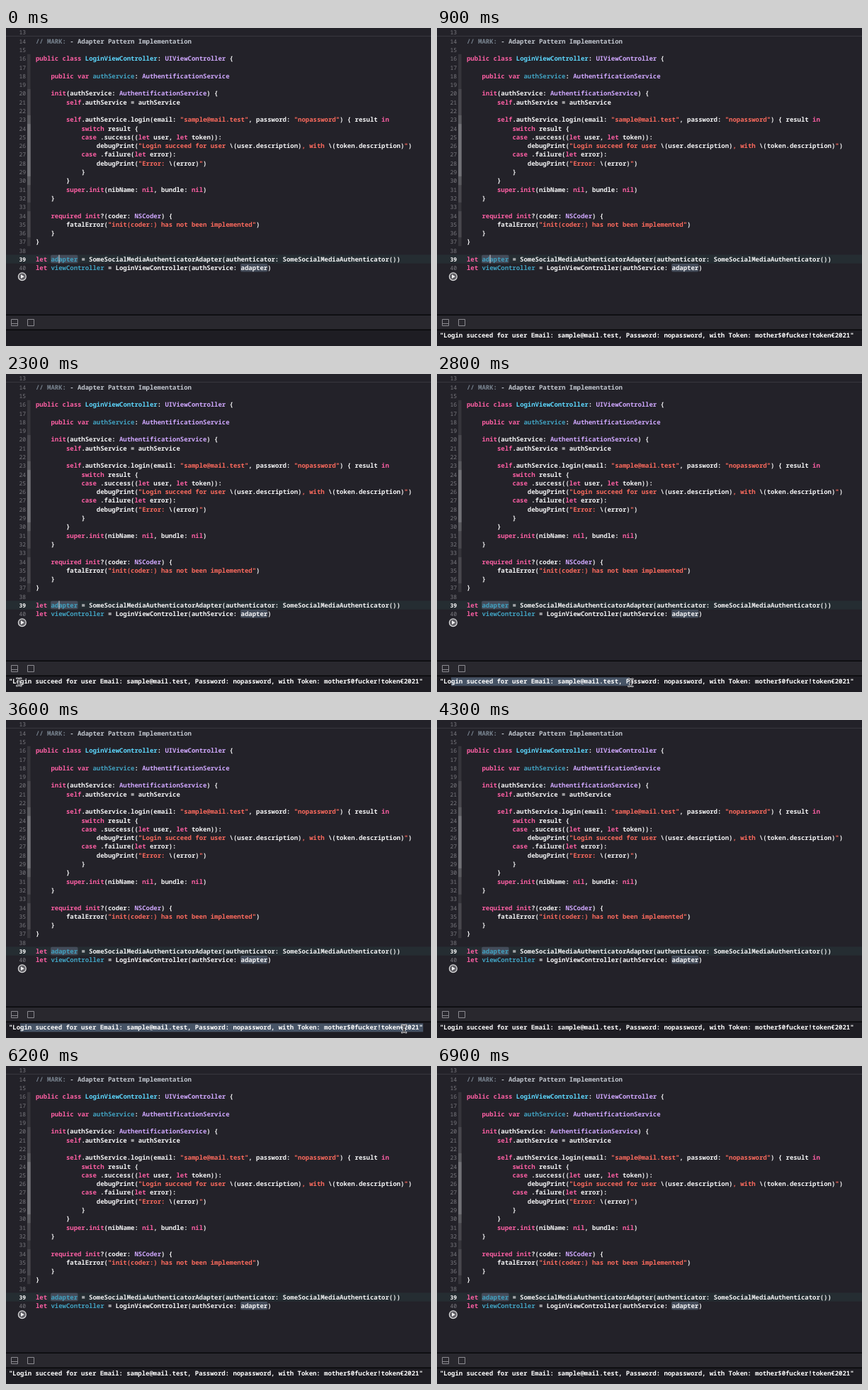
Write an HTML page that moves like this. It is 600x448 px and loops after 7 s.

```html
<!DOCTYPE html>
<html lang="en">
<head>
<meta charset="utf-8">
<title>Adapter pattern playground</title>
<style>
  html, body { margin: 0; width: 100%; height: 100%; overflow: hidden; background: #232229; }
  svg { display: block; }
  text {
    font: 600 8.945px "Noto Sans Mono", "DejaVu Sans Mono", monospace;
    text-rendering: geometricPrecision;
    white-space: pre;
    fill: #f4f4f5;
  }
  .num { font-size: 8px; font-weight: 500; fill: #7b7a80; text-anchor: end; }
  .num.on { font-weight: 600; fill: #fff; }
  .keyword { font-weight: 700; fill: #fc5fa3; }
  .string { fill: #fc6a5d; }
  .type { fill: #d0a8ff; }
  .class { fill: #5dd8ff; }
  .decl { fill: #41a1c0; }
  .comment { fill: #7a8591; }
  .mark { fill: #c3c8d0; }
  #log { font-weight: 700; fill: #fff; }
</style>
</head>
<body>
<svg id="stage" width="600" height="448" viewBox="0 0 600 448">
  <rect width="600" height="448" fill="#232229"/>
  <rect y="11" width="600" height="1" fill="#38373e"/>
  <rect y="319.4" width="600" height="12.3" fill="#252d32"/>
  <g id="ribbons"></g>
  <g fill="#434b59">
    <rect x="63" y="319.7" width="38.5" height="11.6" rx="2"/>
    <rect x="331" y="332" width="38.5" height="11.6" rx="2"/>
  </g>
  <g id="code"></g>
  <rect id="caret" x="74.5" y="319.6" width="1" height="11.8" fill="#d8d8dc"/>
  <circle cx="22.8" cy="350.2" r="5.4" fill="#5e5d63" stroke="#dededf" stroke-width="1.2"/>
  <path d="M21 347.3 L25.8 350.2 L21 353.1 Z" fill="#f0f0f1"/>
  <rect y="404" width="600" height="44" fill="#1e1d23"/>
  <rect y="404" width="600" height="21" fill="#29282e"/>
  <path d="M0 404.3H600M0 425.3H600" stroke="#08080a" stroke-width="1.4"/>
  <path d="M7.5 410.5h9v9h-9zM7.5 416.5h9M30.5 410.5h9v9h-9z" fill="none" stroke="#8b8a90"/>
  <rect id="selection" x="20" y="427.4" height="12" fill="#465365"/>
  <text id="log" x="4" y="436.4"></text>
  <g id="mouse" fill="none" stroke-linecap="round">
    <path d="M-3 -5.2Q0 -5.2 0 -3V3Q0 5.2 -3 5.2M3 -5.2Q0 -5.2 0 -3V3Q0 5.2 3 5.2M-1.6 1.5H1.6" stroke="#e8e8ea" stroke-width="2.4"/>
    <path d="M-3 -5.2Q0 -5.2 0 -3V3Q0 5.2 -3 5.2M3 -5.2Q0 -5.2 0 -3V3Q0 5.2 3 5.2M-1.6 1.5H1.6" stroke="#151419" stroke-width="0.9"/>
  </g>
</svg>
<script>
const LOOP = 7000, FIRST = 13, PITCH = 12.29, CHAR = 5.367, LEFT = 42;
const $ = id => document.getElementById(id);
const baseline = n => 21.7 + (n - 14) * PITCH;

const source = String.raw`
// MARK: - Adapter Pattern Implementation

public class LoginViewController: UIViewController {

    public var authService: AuthentificationService

    init(authService: AuthentificationService) {
        self.authService = authService

        self.authService.login(email: "sample@mail.test", password: "nopassword") { result in
            switch result {
            case .success((let user, let token)):
                debugPrint("Login succeed for user \(user.description), with \(token.description)")
            case .failure(let error):
                debugPrint("Error: \(error)")
            }
        }
        super.init(nibName: nil, bundle: nil)
    }

    required init?(coder: NSCoder) {
        fatalError("init(coder:) has not been implemented")
    }
}

let adapter = SomeSocialMediaAuthenticatorAdapter(authenticator: SomeSocialMediaAuthenticator())
let viewController = LoginViewController(authService: adapter)`.split("\n");

const syntax = new RegExp([
  String.raw`(?<comment>\/\/ MARK:)`,
  String.raw`(?<mark>- Adapter .*)`,
  String.raw`(?<string>"(?:\\\([^)]*\)|[^"\\])*")`,
  String.raw`(?<class>(?<=class )\w+)`,
  String.raw`(?<decl>(?<=(?:var|let) )(?:authService|adapter|viewController))`,
  String.raw`(?<type>\b(?:UIViewController|AuthentificationService|NSCoder)\b)`,
  String.raw`(?<keyword>\b(?:public|class|var|let|init|self|super|switch|case|in|nil|required)\b)`
].join("|"), "g");

function add(parent, tag, attrs, text) {
  const el = document.createElementNS("http://www.w3.org/2000/svg", tag);
  for (const key in attrs) el.setAttribute(key, attrs[key]);
  if (text) el.textContent = text;
  return parent.appendChild(el);
}

function span(parent, text, kind) {
  if (text) add(parent, "tspan", kind ? { class: kind } : {}, text);
}

function highlight(row, line) {
  let end = 0;
  for (const match of line.matchAll(syntax)) {
    span(row, line.slice(end, match.index));
    const kind = Object.keys(match.groups).find(k => match.groups[k]);
    if (kind === "string") {
      for (const part of match[0].split(/(\\\([^)]*\))/)) {
        span(row, part, part.startsWith("\\") ? "" : kind);
      }
    } else {
      span(row, match[0], kind);
    }
    end = match.index + match[0].length;
  }
  span(row, line.slice(end));
}

source.forEach((line, i) => {
  const n = FIRST + i, y = baseline(n);
  add($("code"), "text", { x: 28, y, class: n === 39 ? "num on" : "num" }, String(n));
  const indent = line.search(/\S|$/);
  highlight(add($("code"), "text", { x: LEFT + indent * CHAR, y }), line.trim());
});

// Nested code-folding ribbons: first line, last line, colour
[[16, 37, "#36353b"], [20, 32, "#48474d"], [34, 36, "#48474d"],
 [23, 30, "#5a5a5f"], [24, 29, "#727277"]].forEach(([from, to, fill]) =>
  add($("ribbons"), "rect", {
    x: 30, y: baseline(from) - 9.4, width: 4.5, height: (to - from + 1) * PITCH, fill
  }));

$("log").textContent =
  '"Login succeed for user Email: sample@mail.test, Password: nopassword, with Token: mother$0fucker!token€2021"';

// Pointer path: time, x, y
const path = [
  [1900, 26, 456], [2200, 18, 434], [2500, 19, 434], [3150, 594, 436],
  [3350, 594, 436], [3600, 562, 435], [3750, 562, 436], [3950, 560, 456]
];
const LOG_AT = 500, PRESS = 2500, RELEASE = 3150, CLEAR = 3800;

function pointer(t) {
  const i = path.findIndex(step => step[0] > t);
  if (i < 1) return null;
  const [t0, x0, y0] = path[i - 1], [t1, x1, y1] = path[i];
  const p = (t - t0) / (t1 - t0), e = p * p * (3 - 2 * p);
  return [x0 + (x1 - x0) * e, y0 + (y1 - y0) * e];
}

const show = (id, on) => $(id).setAttribute("visibility", on ? "visible" : "hidden");

function draw(t) {
  const at = pointer(t);
  show("log", t >= LOG_AT);
  show("caret", t < PRESS);
  show("mouse", at);
  if (at) $("mouse").setAttribute("transform", `translate(${at})`);

  const selecting = t >= PRESS && t < CLEAR;
  show("selection", selecting);
  if (selecting) {
    const x = t < RELEASE ? at[0] : 600;
    const column = Math.max(3, Math.min(109, Math.round((x - 4) / CHAR)));
    $("selection").setAttribute("width", (column - 3) * CHAR);
  }
}

const start = performance.now();
function tick() {
  const t = (performance.now() - start) % LOOP;
  draw(Math.floor(t / 100) * 100);
  requestAnimationFrame(tick);
}
tick();
</script>
</body>
</html>
```
